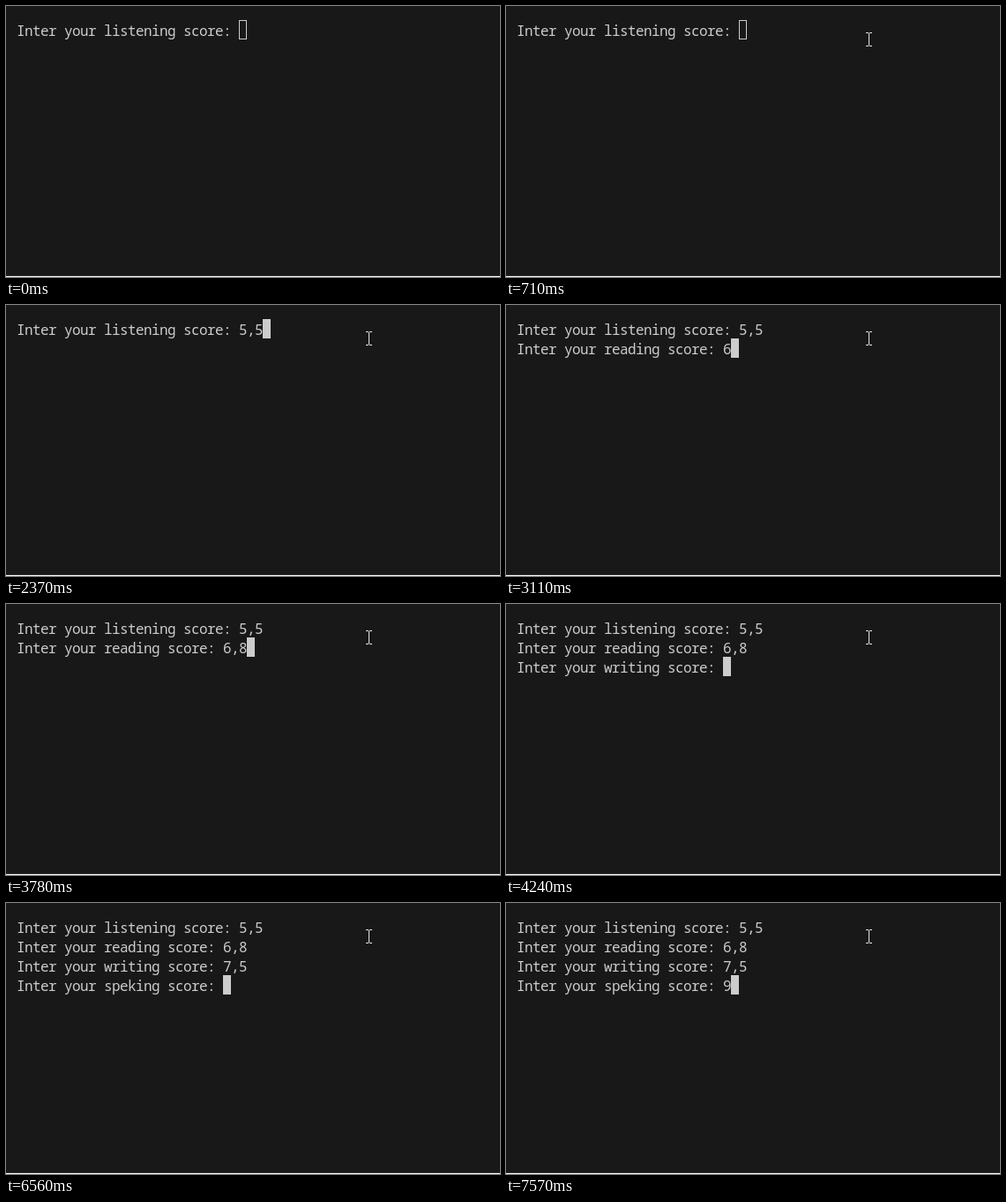
Write an HTML page with a canvas that moves like this. It is 560x308 px and loops after 8000 ms.

```html
<!DOCTYPE html>
<html lang="en">
<head>
<meta charset="utf-8">
<title>Score entry</title>
<style>
html, body { margin: 0; width: 100%; height: 100%; overflow: hidden; background: #181818; }
canvas { display: block; }
</style>
</head>
<body>
<canvas id="stage" width="560" height="308"></canvas>
<script>
const ctx = document.getElementById('stage').getContext('2d');
const LOOP = 8000, LEFT = 12, TOP = 16, CELL = 9, ROW = 22, BASELINE = 18;
const FOCUS = 980, CLICK_END = 1180;
const INK = '#cccccc';

const prompt = skill => `Inter your ${skill} score: `;

// [time, text added to the terminal]
const output = [
  [0, prompt('listening')],
  [1710, '5'], [1970, ','], [2370, '5'],
  [2570, '\n' + prompt('reading')],
  [3110, '6'], [3380, ','], [3780, '8'],
  [4240, '\n' + prompt('writing')],
  [4640, '7'], [5040, ','], [5830, '5'],
  [6560, '\n' + prompt('speking')],
  [7570, '9']
];

// [time, pointer centre y]
const pointerPath = [[500, 142], [570, 92], [640, 54], [710, 38]];

// Each glyph starts on its own terminal cell.
function drawLine(line, row) {
  [...line].forEach((ch, col) => {
    ctx.fillText(ch, LEFT + col * CELL, TOP + row * ROW + BASELINE);
  });
}

function drawTerminal(t) {
  const lines = output.filter(([at]) => t >= at).map(([, s]) => s).join('').split('\n');
  ctx.font = '500 16px "Noto Sans Mono", "DejaVu Sans Mono", monospace';
  ctx.textBaseline = 'alphabetic';
  ctx.fillStyle = INK;
  lines.forEach(drawLine);

  const row = lines.length - 1;
  const x = LEFT + lines[row].length * CELL, y = TOP + row * ROW;
  if (t >= FOCUS) {
    ctx.fillRect(x, y, CELL, ROW);
  } else {
    ctx.strokeStyle = INK;
    ctx.lineWidth = 1;
    ctx.strokeRect(x + 0.5, y + 0.5, CELL - 1, ROW - 1);
  }
}

function drawPointer(t) {
  const step = pointerPath.filter(([at]) => t >= at).pop();
  if (!step) return;
  const x = 411, y = step[1];
  if (t >= FOCUS && t < CLICK_END) {
    ctx.fillStyle = 'rgba(255, 255, 0, 0.47)';
    ctx.beginPath();
    ctx.arc(409, 37, 15, 0, Math.PI * 2);
    ctx.fill();
  }
  ctx.fillStyle = '#e7e7e7';
  for (const edge of [y - 8, y + 7]) {
    ctx.fillRect(x - 3, edge, 3, 1);
    ctx.fillRect(x + 1, edge, 3, 1);
  }
  ctx.fillRect(x, y - 7, 1, 14);
}

function draw(t) {
  ctx.fillStyle = '#181818';
  ctx.fillRect(0, 0, 560, 308);
  ctx.fillStyle = '#2b2b2b';
  ctx.fillRect(0, 306, 560, 1);
  ctx.fillStyle = '#ffffff';
  ctx.fillRect(0, 307, 560, 1);
  drawTerminal(t);
  drawPointer(t);
}

const start = performance.now();
function tick() {
  draw((performance.now() - start) % LOOP);
  requestAnimationFrame(tick);
}
tick();
</script>
</body>
</html>
```
